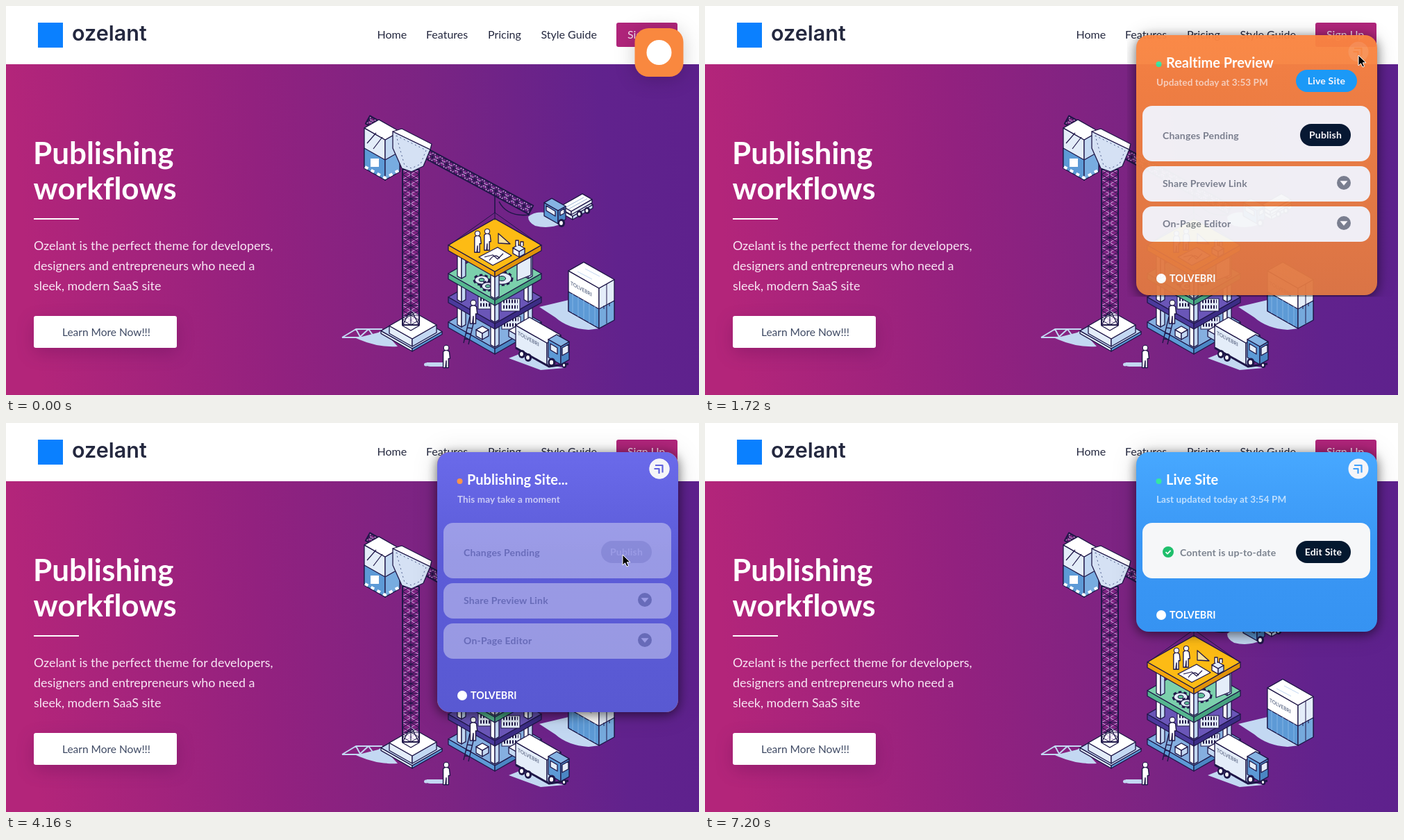
These frames come from a looping animation (998 by 561 pixels, 7.24 s). An HTML page:

```html
<!DOCTYPE html>
<html lang="en">
<head>
<meta charset="utf-8">
<title>Publishing workflows</title>
<style>
  html, body { margin: 0; width: 100%; height: 100%; overflow: hidden; background: #fff; }
  svg { display: block; width: 998px; height: 561px; }
  text { font-family: Lato, sans-serif; white-space: pre; font-variant-ligatures: none; }
  .brand { font: 600 30.5px Inter, sans-serif; fill: #24283f; }
  .nav { font-size: 16px; fill: #24283f; }
  .light { fill: #f8e3f1; }
  .h1 { font-size: 44px; font-weight: 700; fill: #fff; }
  .body { font-size: 17.9px; fill: #f8e6f4; }
  .cta { font-size: 15.5px; fill: #3f4a64; }
  #cta { width: 206px; filter: drop-shadow(0 8px 12px rgba(40, 0, 60, .2)); }
  .plain text:not(.brand) { font-family: "Liberation Sans", Arial, sans-serif; }
  .plain .nav, .plain .cta { font-size: 15.5px; }
  .plain .h1 { font-size: 42.5px; }
  .title { font-size: 20px; font-weight: 700; fill: #fff; }
  .plain #cta { width: 208px; }
  .sub, .label, .btn { font-size: 14px; font-weight: 700; letter-spacing: .2px; }
  .sub { font-size: 13.5px; letter-spacing: .1px; fill: #fff; opacity: .66; }
  .label { fill: #7b838f; }
  .btn { fill: #fff; text-anchor: middle; }
  .mark { font-size: 14.2px; font-weight: 700; fill: #fff; }
  .tiny { font-size: 8px; font-weight: 700; fill: #6a7590; }
  .shade { filter: drop-shadow(0 3px 8px rgba(0, 0, 0, .55)) drop-shadow(0 0 16px rgba(0, 0, 0, .14)); }
  .soft { filter: drop-shadow(0 3px 14px rgba(0, 0, 0, .2)); }
</style>
</head>
<body>
<script>
const LOOP = 7240;
const INK = '#1f1748', WHITE = '#fff', PALE = '#c3d8f2', BLUE = '#5d9ad6', MIST = '#e4edf9';

// Markup helpers
const text = (x, y, s, cls, extra = '') => `<text x="${x}" y="${y}" class="${cls}" ${extra}>${s}</text>`;
const rect = (x, y, w, h, r, fill, extra = '') =>
  `<rect x="${x}" y="${y}" width="${w}" height="${h}" rx="${r}" fill="${fill}" ${extra}/>`;
const circle = (x, y, r, fill, extra = '') => `<circle cx="${x}" cy="${y}" r="${r}" fill="${fill}" ${extra}/>`;
const oval = (x, y, rx, ry, fill, extra = '') =>
  `<ellipse cx="${x}" cy="${y}" rx="${rx}" ry="${ry}" fill="${fill}" ${extra}/>`;
const path = (d, fill = 'none', stroke = INK, w = 1.3, extra = '') =>
  `<path d="${d}" fill="${fill}" stroke="${stroke}" stroke-width="${w}" stroke-linejoin="round" ${extra}/>`;
const grad = (id, stops, dir = 'x2="0" y2="1"') => `<linearGradient id="${id}" ${dir}>` +
  stops.map(([o, c]) => `<stop offset="${o}" stop-color="${c}"/>`).join('') + '</linearGradient>';

// Isometric block whose front top corner is (x, y)
const K = .57;
function block(x, y, l, r, h, top, left, right) {
  return path(`M${x} ${y}l${-l} ${-l * K}v${h}l${l} ${l * K}z`, left) +
    path(`M${x} ${y}l${r} ${-r * K}v${h}l${-r} ${r * K}z`, right) +
    path(`M${x} ${y}l${-l} ${-l * K}l${r} ${-r * K}l${l} ${l * K}z`, top);
}

// Truss between two points
function truss(x1, y1, x2, y2, w, n) {
  const len = Math.hypot(x2 - x1, y2 - y1);
  const nx = -(y2 - y1) / len * w / 2, ny = (x2 - x1) / len * w / 2;
  const at = (i, s) => `${(x1 + (x2 - x1) * i / n + s * nx).toFixed(1)} ${(y1 + (y2 - y1) * i / n + s * ny).toFixed(1)}`;
  let cross = '', bars = '';
  for (let i = 0; i < n; i++) {
    cross += `M${at(i, -1)}L${at(i + 1, 1)}M${at(i, 1)}L${at(i + 1, -1)}`;
    bars += `M${at(i, -1)}L${at(i, 1)}M${at(i, 0)}L${at(i + .5, 1)}L${at(i + 1, 0)}L${at(i + .5, -1)}Z`;
  }
  return path(cross, 'none', '#cfaee2', 1) + path(bars, 'none', INK, 1) +
    path(`M${at(0, -1)}L${at(n, -1)}L${at(n, 1)}L${at(0, 1)}Z`, 'none', INK, 2) +
    path(`M${at(0, 0)}L${at(n, 0)}`, 'none', INK, 1.2);
}

const wheel = (x, y, r) => oval(x, y, r * .85, r, INK) + oval(x - .5, y, r * .4, r * .5, WHITE);
const person = (x, y, s = 1) => `<g transform="translate(${x} ${y}) scale(${s})">` +
  path('M-4 5q4-4 8 0l1 9h-2v12h-3v-9l-1 9h-3z', WHITE) + circle(0, 0, 3.4, WHITE, `stroke="${INK}"`) + '</g>';
const gear = (x, y, r) => oval(x, y, r, r * .6, 'none', `stroke="${INK}" stroke-width="5" stroke-dasharray="4 3"`) +
  oval(x, y, r, r * .6, MIST, `stroke="${INK}" stroke-width="1.2"`) + oval(x, y, r * .4, r * .25, '#5fc29b', `stroke="${INK}"`);

function crane() {
  return path('M484 478l20-12h38M504 466l6 11l12-11l8 11l12-9M484 478h58', 'none', PALE, 2) +
    path('M504 479l40-10l20 22q-30 2-60-12z', PALE, 'none') +
    block(585, 494, 45, 43, 4, PALE, MIST, BLUE) +
    block(585, 480, 33, 35, 11, WHITE, MIST, PALE) +
    path('M571 461l12-24l12 24l-12 7z') +
    truss(583, 236, 583, 460, 24, 16) +
    truss(521, 164, 560, 186, 13, 4) + truss(604, 212, 756, 294, 14, 15) +
    block(546, 193, 30, 21, 58, WHITE, MIST, PALE) +
    path('M516 205l30 17v29l-30-17z', BLUE) + path('M546 222l21-12v29l-21 12z', '#78ace0') +
    path('M520 198l13-15M529 206l13-17', 'none', INK, 1.2) +
    path('M517 232l29 16l20-11', 'none', WHITE, 4, 'stroke-dasharray="5 5"') +
    rect(525, 220, 12, 12, 0, WHITE) +
    path('M557 181l54 26l-10 24l-17 8l-14-5l-13-29z', '#d5e1f4') +
    path('M562 187l43 21l-8 20l-13 6l-10-4z', 'none', '#50608f', 1, 'stroke-dasharray="2 4"') +
    path('M557 181l13-4l43 22l-2 8z', WHITE) +
    path('M704 271v28M710 282q12 23 44 19', 'none', INK, 1.6);
}

function tower() {
  // Columns standing between two floors; y is the top of the front one
  const posts = (y, h) => [[704, y - 72], [656, y - 29], [752, y - 29]]
    .map(([x, top]) => block(x, top, 6, 6, h, WHITE, WHITE, PALE)).join('');
  const front = (y, h) => block(704, y, 6, 6, h, WHITE, WHITE, PALE);
  const slab = (y, top, left, right) => block(704, y, 67, 67, 8, top, left, right);
  const shelf = (x, y) => rect(x, y, 27, 18, 0, MIST, `stroke="${INK}"`) +
    path(`M${x + 3} ${y + 4}h21M${x + 3} ${y + 12}h21`, 'none', INK, 5, 'stroke-dasharray="2 2"');
  return slab(494, '#85afe0', BLUE, '#4b86c4') + posts(464, 28) + shelf(714, 448) +
    block(686, 472, 9, 9, 9, WHITE, MIST, PALE) + block(735, 474, 11, 9, 9, WHITE, PALE, BLUE) + front(464, 28) +
    slab(458, '#6a56b8', '#4b3a9c', '#3c2d86') + posts(428, 28) + shelf(680, 419) + shelf(713, 422) + front(428, 28) +
    slab(424, '#7bd0ac', '#55b78f', '#46a380') + posts(388, 34) + gear(685, 395, 10) + gear(714, 393, 14) +
    gear(694, 404, 9) + path('M736 372l20-10v26l-20 8z', MIST) + front(388, 34) +
    slab(383, '#fdbb14', '#f2a50d', '#e0930a') +
    path('M681 362l27-14l20 12l-27 14z', WHITE) + path('M689 362l12-3l7 6l8-8M696 367q8-12 15-3', 'none', INK, 1.2) +
    path('M709 328v14l17 1z', '#fde29a') +
    block(739, 354, 9, 8, 8, MIST, WHITE, PALE) + path('M734 346v-8h4v8M741 346v-6h4v6', WHITE) +
    person(679, 328, 1.05) + person(693, 325, 1.05) +
    path('M704 298L638 345M704 298L770 345M704 298V309', 'none', INK, 1) +
    path('M659 486l9-38M666 488l9-38M661 480l7 1M663 472l7 1M665 464l7 1', 'none', INK, 1.4) + person(673, 428, 1.15);
}

function vehicles() {
  const label = (x, y, k) => text(0, 0, 'TOLVEBRI', 'tiny', `transform="matrix(.82 ${k} 0 .95 ${x} ${y})"`);
  return path('M752 304q8-8 26-6l22 16q-18 8-38 3q-10-5-10-13z', PALE, 'none') +
    block(816, 303, 14, 29, 5, MIST, MIST, PALE) + block(814, 296, 14, 30, 5, WHITE, WHITE, MIST) +
    path('M805 291l27-15M810 293l27-15', 'none', '#9eb6d5', 1) +
    block(795, 295, 20, 11, 19, '#86b4e3', BLUE, '#4b86c4') +
    path('M778 288l13 8v7l-13-8zM798 296l6-4v7l-6 3z', MIST) +
    wheel(800, 313, 6) + wheel(826, 300, 5) + wheel(837, 295, 5) +
    path('M768 434l42-10l45 41l-16 2q-30-2-48-18z', PALE, 'none') +
    block(854, 407, 44, 22, 58, WHITE, WHITE, MIST) +
    path('M810 412l44 25v28l-44-25z', BLUE) + path('M854 437l22-12v28l-22 12z', '#76aadd') +
    path('M865 401v57M861 432v5M869 428v5', 'none', INK, 1) +
    path('M816 415v28M824 420v28M832 424v28M840 429v28M848 433v28', 'none', '#83b4e4', 1) +
    path('M823 383l21 11M834 379l21 11', 'none', PALE, 1) + label(813, 402, .46) +
    path('M724 508l30-12l32 22l18 4l-34 3z', PALE, 'none') +
    block(779, 486, 45, 20, 32, WHITE, MIST, PALE) + label(737, 474, .46) +
    path('M734 493l48 27l28-4', 'none', INK, 3) +
    block(799, 491, 18, 12, 26, '#86b4e3', BLUE, '#4b86c4') +
    path('M801 493l9-5v11l-9 5zM784 487l10 6v9l-10-6z', MIST) +
    wheel(743, 502, 6) + wheel(752, 507, 6) + wheel(786, 514, 6.5) + wheel(804, 518, 4) +
    path('M606 514h28v6h-20q-12 0-8-6z', PALE, 'none') + oval(605, 517, 3, 2.5, PALE) + person(634, 493, 1.1);
}

const page = `<g id="page">
  ${rect(0, 0, 998, 84, 0, WHITE)}${rect(0, 84, 998, 477, 0, 'url(#hero)')}
  ${rect(46, 24, 36, 36, 0, '#0a80ff')}${text(95, 50, 'ozelant', 'brand')}
  ${text(534.5, 46.5, 'Home', 'nav')}${text(605, 46.5, 'Features', 'nav')}
  ${text(694, 46.5, 'Pricing', 'nav')}${text(770.5, 46.5, 'Style Guide', 'nav')}
  ${rect(879, 24, 88, 35, 3, '#b0257b')}${text(895, 46.5, 'Sign Up', 'nav light')}
  ${text(39, 228, 'Publishing', 'h1')}${text(39.5, 278.5, 'workflows', 'h1')}${rect(40, 306, 65, 2, 0, WHITE)}
  ${text(40, 352, 'Ozelant is the perfect theme for developers,', 'body')}
  ${text(40, 381, 'designers and entrepreneurs who need a', 'body')}
  ${text(40, 410, 'sleek, modern SaaS site', 'body')}
  ${rect(40, 447, 206, 46, 3, WHITE, 'id="cta"')}${text(81, 475.5, 'Learn More Now!!!', 'cta')}
  ${crane()}${tower()}${vehicles()}</g>`;

// Widget parts
const card = (y, h) => rect(630, y, 328, h, 14, '#f6f7f9');
const drop = y => circle(920, y, 10, '#7b838f') + path(`M915 ${y - 2.5}h10l-5 6z`, WHITE, WHITE, .5);
const dot = c => circle(653.5, 84, 4, c);
const footer = y => circle(657, y, 7, WHITE) + text(669, y + 5, 'TOLVEBRI', 'mark');
const fold = (id, c) => `<g id="${id}">${circle(941, 66, 14.5, '#f5f5f8')}` +
  path('M935 61h10.5v10.5M933.5 66h7v7', 'none', c, 2.2) + '</g>';
const pill = (x, y, w, fill, label, id) => `<g id="${id}">${rect(x, y, w, 32, 16, fill)}` +
  text(x + w / 2, y + 21, label, 'btn') + '</g>';
const heading = (c, a, b) => dot(c) + text(664, 89, a, 'title') + text(650, 115, b, 'sub');

const editor = `<g id="editor" clip-path="url(#clipA)">
  ${rect(621, 42, 347, 375, 18, 'url(#orange)', 'class="shade"')}${rect(621, 42, 347, 375, 18, 'url(#indigo)', 'id="busy"')}
  <g id="idleHead">${heading('#35e8a0', 'Realtime Preview', 'Updated today at 3:53 PM')}${pill(851, 92, 88, '#189ffb', 'Live Site', 'visit')}</g>
  <g id="busyHead">${heading('#ff9448', 'Publishing Site...', 'This may take a moment')}</g>
  <g id="cards">${card(144, 80)}${card(231, 51)}${card(289, 51)}
    ${text(659, 191.5, 'Changes Pending', 'label')}${text(659, 261, 'Share Preview Link', 'label')}
    ${text(659, 319, 'On-Page Editor', 'label')}${drop(255)}${drop(313)}
    ${pill(857, 170, 73, '#04182f', 'Publish', 'publish')}</g>
  ${footer(393)}${fold('foldA', '#f5853f')}${fold('foldB', '#6163df')}</g>`;

const live = `<g id="live" clip-path="url(#clipB)">
  ${rect(621, 42, 347, 259, 18, 'url(#sky)', 'class="shade"')}
  ${heading('#35e8a0', 'Live Site', 'Last updated today at 3:54 PM')}${card(144, 80)}
  ${circle(667, 186, 8, '#1fbf6c')}${path('M663.5 186l2.5 2.6l4.6-4.8', 'none', WHITE, 1.8)}
  ${text(684, 191.5, 'Content is up-to-date', 'label')}${pill(851, 170, 79, '#04182f', 'Edit Site', 'edit')}
  ${footer(277)}${fold('foldC', '#3f9ffa')}</g>`;

document.body.innerHTML = `<svg viewBox="0 0 998 561"><defs>
  ${grad('hero', [[0, '#b3257a'], [.35, '#92217f'], [.6, '#7b2483'], [.85, '#61228d'], [1, '#5d218d']], 'x2="1" y2="-.05"')}
  ${grad('orange', [[0, '#fa8540'], [1, '#df7843']])}${grad('indigo', [[0, '#6a6aea'], [.4, '#5c5cd8'], [1, '#5959d2']])}
  ${grad('sky', [[0, '#47a8ff'], [.5, '#3a97f5'], [1, '#3693f2']])}
  <clipPath id="clipA"><rect/></clipPath><clipPath id="clipB"><rect/></clipPath></defs>
  ${page}${editor}${live}
  <g id="badge">${rect(905.5, 32, 70, 70, 20, '#f9883f', 'class="soft" id="tile"')}${circle(940.5, 67, 18, WHITE, 'id="glyph"')}</g>
  <g id="cursor">${path('M0 0V15L3.5 11.8L6 17L8.5 16L6.2 10.8H11Z', '#000', WHITE, 1, 'id="arrow"')}
  ${path('M-2 1q1.5-3 3.5 0v5l7 2q2 1 1 4l-1 4h-8.5l-5-7q1-2 3 0z', WHITE, '#000', 1.1, 'id="hand"')}</g></svg>`;

const $ = id => document.getElementById(id);
const ease = p => p * p * (3 - 2 * p);

// Value at time t from [time, value] steps
function key(t, steps, curve = p => p) {
  if (t <= steps[0][0]) return steps[0][1];
  for (let i = 1; i < steps.length; i++) {
    const [a, u] = steps[i - 1], [b, v] = steps[i];
    if (t < b) return u + (v - u) * curve((t - a) / (b - a));
  }
  return steps[steps.length - 1][1];
}
const show = (id, on) => { $(id).style.display = on ? '' : 'none'; };
const fade = (id, v) => { $(id).style.opacity = v; };

function unfold(id, clipId, p) {
  const done = p >= 560;
  const left = done ? 0 : key(p, [[0, 968], [80, 818], [180, 700], [360, 608], [560, 560]]);
  const bottom = done ? 561 : key(p, [[0, 42], [80, 199], [180, 323], [360, 419], [560, 480]]);
  const top = done ? 0 : 15;
  const box = $(clipId).firstElementChild;
  Object.entries({ x: left, y: top, width: 998 - left, height: bottom - top })
    .forEach(([k, v]) => box.setAttribute(k, v));
  fade(id, key(p, [[0, .5], [80, .65], [360, .96], [500, 1]]));
}

const OPEN = 1360, CLICK = 2760, RELOAD = 4960, FONTS = 5440, LIVE = 5600;

function draw(t) {
  $('page').classList.toggle('plain', t >= RELOAD && t < FONTS);
  show('editor', t >= OPEN && t < RELOAD);
  show('live', t >= LIVE);
  unfold('editor', 'clipA', t - OPEN);
  unfold('live', 'clipB', t - LIVE);

  const round = key(t, [[1160, 0], [1300, 1]], ease);
  $('tile').setAttribute('rx', 20 + 15 * round);
  $('glyph').setAttribute('r', 18 - 5 * round);
  show('badge', t < 1680);
  fade('badge', key(t, [[1480, 1], [1680, 0]]));

  const busy = key(t, [[CLICK, 0], [CLICK + 280, 1]], ease);
  fade('busy', busy);
  fade('cards', 1 - .6 * busy);
  fade('publish', 1 - .8 * busy);
  fade('foldA', key(t, [[1700, 0], [1900, 1]]));
  fade('foldB', busy);
  fade('foldC', key(t - LIVE, [[340, 0], [540, 1]]));
  show('idleHead', t < CLICK + 80);
  show('busyHead', t >= CLICK + 80);

  const hover = t >= 2260 && t < CLICK + 200;
  $('publish').firstElementChild.setAttribute('fill', t >= 2260 ? '#1f2a5a' : '#04182f');
  const x = key(t, [[560, 760], [1240, 941], [1860, 941], [2320, 888]], ease);
  const y = key(t, [[560, 570], [1240, 71], [1860, 71], [2320, 190]], ease);
  $('cursor').setAttribute('transform', `translate(${x} ${y})`);
  show('cursor', t >= 560 && t < RELOAD);
  show('arrow', !hover);
  show('hand', hover);
}

const start = performance.now();
function tick() {
  draw((performance.now() - start) % LOOP);
  requestAnimationFrame(tick);
}
tick();
</script>
</body>
</html>
```
